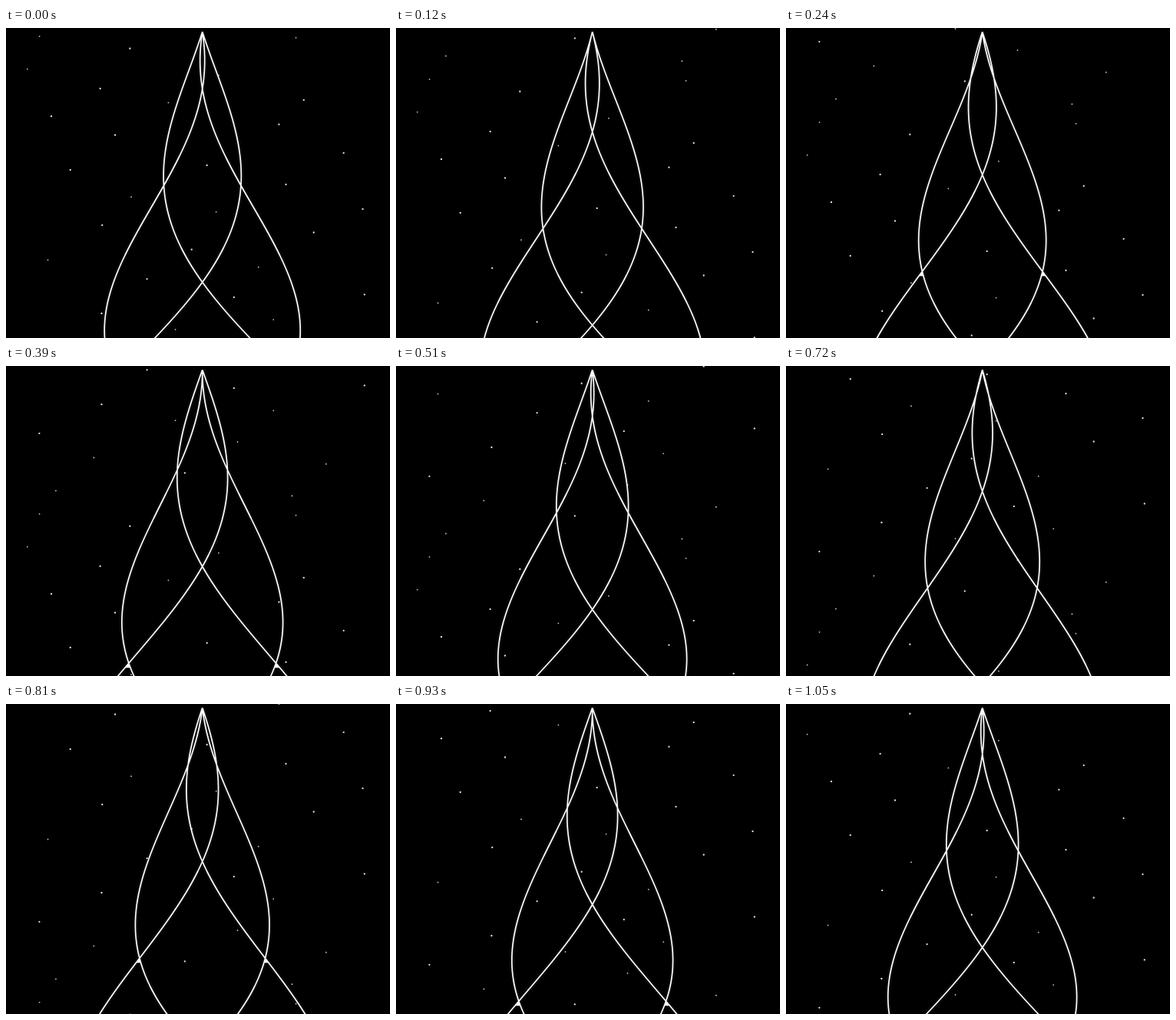
An HTML page with a canvas that plays this animation: 500x404 px, repeating every 1.08 s.

```html
<!DOCTYPE html>
<html lang="en">
<head>
<meta charset="utf-8">
<title>Braided strands</title>
<style>
  html, body { margin: 0; width: 100%; height: 100%; overflow: hidden; background: #000; }
  canvas { display: block; }
</style>
</head>
<body>
<canvas id="stage" width="500" height="404"></canvas>
<script>
const W = 500, H = 404;
const STEP_MS = 30, STEPS = 36, SPEED = 14;
const FIELD = STEPS * SPEED;        // height of the repeating star field
const QUARTER = FIELD / 2;          // a quarter of a strand's wavelength
const APEX = { x: 255.7, y: 5 };
const SPREAD = 0.3545;
const STARS = 36;
const ctx = document.getElementById('stage').getContext('2d');

function seeded(seed) {
  return () => {
    seed = (seed * 1664525 + 1013904223) % 4294967296;
    return seed / 4294967296;
  };
}

// one star per horizontal band, spread sideways by the golden ratio
const rand = seeded(7);
const stars = Array.from({ length: STARS }, (_, i) => ({
  x: 27 + 463 * ((i * 0.618 + 0.15 * rand()) % 1),
  y: (i + rand()) * FIELD / STARS,
  bright: rand() < 0.5
}));

function drawStars(step) {
  for (const { x, y, bright } of stars) {
    ctx.fillStyle = bright ? '#e4e4e4' : '#c4c4c4';
    ctx.beginPath();
    ctx.arc(x, (y + step * SPEED) % FIELD - 2, bright ? 1.15 : 0.9, 0, Math.PI * 2);
    ctx.fill();
  }
}

// horizontal offset of a strand that meets the axis at height c
function offset(y, c) {
  return SPREAD * (y - APEX.y) * Math.sin((y - c) / QUARTER * Math.PI / 2);
}

function traceStrand(c, side) {
  ctx.moveTo(APEX.x, APEX.y);
  for (let y = APEX.y; y <= H + 6; y += 2) {
    ctx.lineTo(APEX.x + side * offset(y, c), y);
  }
}

// solid wedge just below the point where two neighbouring strands cross
function fillFork(top, side) {
  const c = top - QUARTER / 2, low = top + 6;
  ctx.beginPath();
  ctx.moveTo(APEX.x + side * offset(top, c), top);
  ctx.lineTo(APEX.x + side * offset(low, c), low);
  ctx.lineTo(APEX.x - side * offset(low, c + QUARTER), low);
  ctx.fill();
}

function drawStrands(step) {
  const c = (79.3 + step * SPEED) % QUARTER;
  ctx.beginPath();
  for (const side of [-1, 1]) {
    traceStrand(c, side);
    traceStrand(c + QUARTER, side);
  }
  ctx.lineJoin = 'round';
  ctx.strokeStyle = 'rgba(255,255,255,0.05)';
  ctx.lineWidth = 6;
  ctx.stroke();
  ctx.strokeStyle = '#fff';
  ctx.lineWidth = 1.7;
  ctx.stroke();

  ctx.fillStyle = '#fff';
  for (let top = c + QUARTER / 2; top < H; top += QUARTER) {
    if (top < 290) continue;
    fillFork(top, -1);
    fillFork(top, 1);
  }
}

function draw(ms) {
  const step = Math.floor(ms / STEP_MS) % STEPS;
  ctx.fillStyle = '#000';
  ctx.fillRect(0, 0, W, H);
  drawStars(step);
  drawStrands(step);
}

const start = performance.now();
function tick() {
  draw(performance.now() - start);
  requestAnimationFrame(tick);
}
tick();
</script>
</body>
</html>
```
